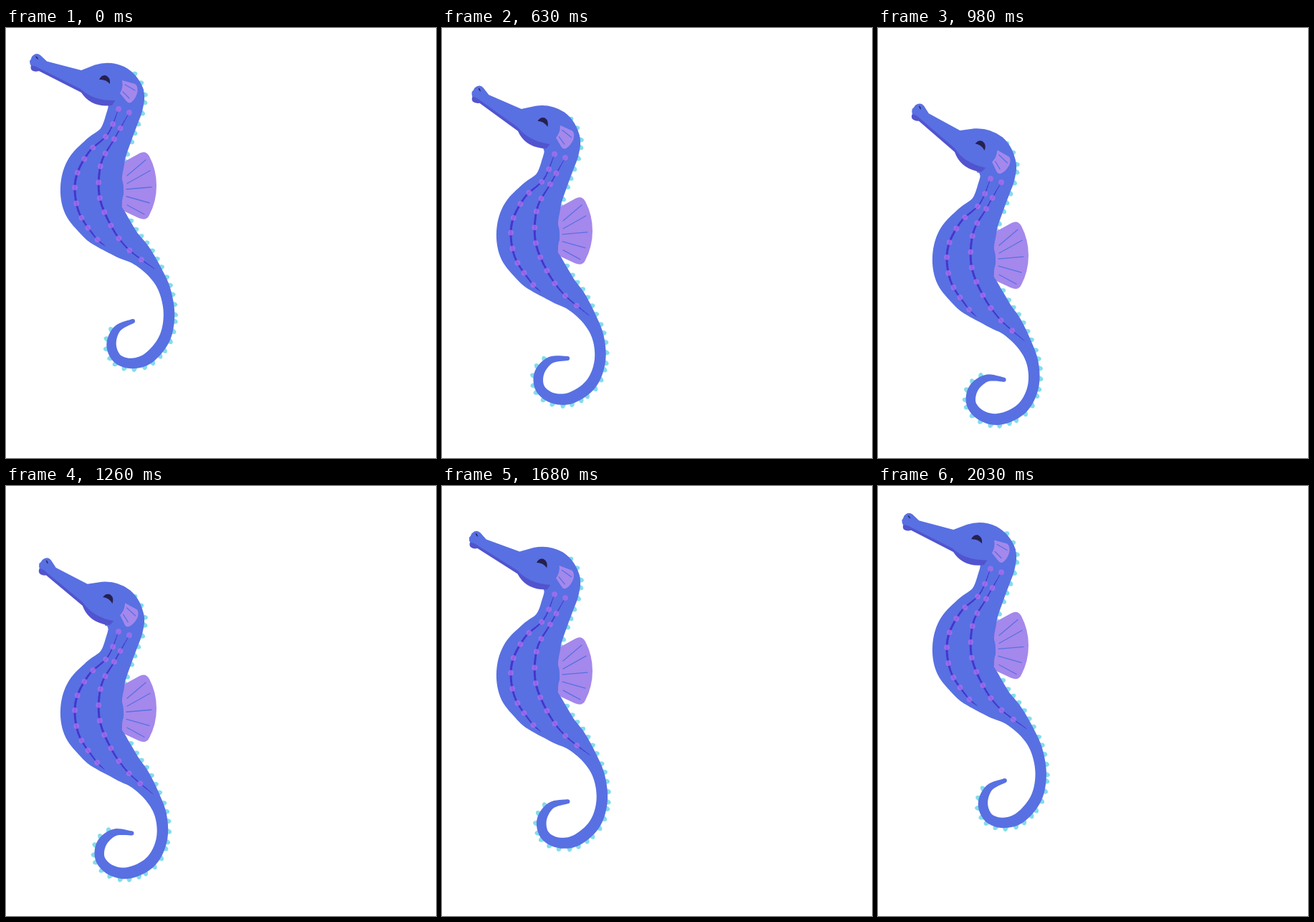
These frames come from a looping animation (600 by 600 pixels, 2100 ms). An HTML page with a canvas:

```html
<!DOCTYPE html>
<html>
<head>
<meta charset="utf-8">
<style>
html, body { margin: 0; width: 100%; height: 100%; overflow: hidden; background: #fff; }
canvas { display: block; width: 600px; height: 600px; }
</style>
</head>
<body>
<canvas id="stage" width="600" height="600"></canvas>
<script>
const ctx = document.getElementById('stage').getContext('2d');
const BLUE = '#5870e2', JAW = '#5154ce', LILAC = '#a488ec', LINE = '#4535cf',
      DOT = '#ae6fee', SPIKE = '#84dcea', INK = '#26204f';
const LOOP = 2100, STEP = 70, HALF = 1065, DROP = 99, NOD = 14.2, DEG = Math.PI / 180;

// Middle of the body from neck to tail tip: x, y, half width
const spine = curve([
  [155, 78, 27], [165, 95, 28], [166.5, 110, 24.5], [162, 126, 23], [152, 152, 23.5],
  [137, 175, 32.5], [124, 199.5, 41], [120, 222, 44], [122.5, 245, 42.7], [132, 266, 35.5],
  [144.5, 280, 31.5], [165.5, 299.5, 23.5], [187, 316, 16.5], [207.5, 340, 10.5],
  [221.5, 366, 8.2], [227.5, 400, 7.7], [221, 433.5, 8], [199.5, 460, 8], [175.5, 468, 7.2],
  [155, 461, 6.7], [147, 441, 6.7], [155.5, 419.5, 5], [177, 409, 3]
]);
const stripes = [
  [[157, 113], [142, 148], [115, 174], [97, 212], [101, 255], [123, 290], [138, 304]],
  [[172, 118], [151, 155], [133, 188], [130, 232], [144, 271], [168, 306], [207, 336]]
].map(curve);
const STRIPE_START = 42, DOT_GAP = 20.9;

// Catmull-Rom curve, eight samples per span
function curve(pts) {
  const out = [], last = pts.length - 1;
  for (let i = 0; i < last; i++) {
    const a = pts[Math.max(i - 1, 0)], b = pts[i], c = pts[i + 1], d = pts[Math.min(i + 2, last)];
    for (let u = 0; u < 1; u += 1 / 8) {
      out.push(b.map((v, j) => v + u / 2 * (c[j] - a[j] +
        u * (2 * a[j] - 5 * v + 4 * c[j] - d[j] + u * (3 * (v - c[j]) + d[j] - a[j])))));
    }
  }
  return [...out, pts[last]];
}

const smooth = u => {
  u = Math.min(Math.max(u, 0), 1);
  return u * u * (3 - 2 * u);
};
const gap = (a, b) => Math.hypot(b[0] - a[0], b[1] - a[1]);

// Turns each step of a line further the closer it lies to the tail tip
function curl(pts, p, s = 0) {
  let [x, y] = pts[0];
  return pts.map((q, i) => {
    if (i) {
      const o = pts[i - 1], dx = q[0] - o[0], dy = q[1] - o[1];
      s += gap(o, q);
      const turn = p * DEG * (4.5 * smooth((s - 235) / 25) + 27 * smooth((s - 320) / 145));
      x += dx * Math.cos(turn) - dy * Math.sin(turn);
      y += dx * Math.sin(turn) + dy * Math.cos(turn);
    }
    return [x, y, q[2]];
  });
}

// Outline on one side of the body: 1 is the back, -1 the belly
function side(mid, sign) {
  return mid.map(([x, y, w], i) => {
    const a = mid[Math.max(i - 1, 0)], b = mid[Math.min(i + 1, mid.length - 1)], k = sign * w / gap(a, b);
    return [x + (b[1] - a[1]) * k, y - (b[0] - a[0]) * k];
  });
}

// Sample numbers at even lengths along a line
function marks(pts, from, to, step) {
  const found = [];
  let s = 0;
  for (let i = 1; i < pts.length; i++) {
    if (s >= from && s < to) {
      found.push(i - 1);
      from += step;
    }
    s += gap(pts[i - 1], pts[i]);
  }
  return found;
}

const openBack = side(spine, 1);
const spikes = [...marks(openBack, 1, 135, 14.4), ...marks(openBack, 216, 550, 13.2)]
  .filter(i => i > 0 && i < spine.length - 5);

function fill(d, color) {
  ctx.fillStyle = color;
  ctx.fill(new Path2D(d));
}

function stroke(d, color, width) {
  ctx.strokeStyle = color;
  ctx.lineWidth = width;
  ctx.stroke(new Path2D(d));
}

function drawSpikes(edge) {
  for (const i of spikes) {
    const a = edge[i - 1], b = edge[i + 1];
    ctx.save();
    ctx.translate(...edge[i]);
    ctx.rotate(Math.atan2(b[1] - a[1], b[0] - a[0]));
    fill('M-4 1Q-3-4.5 .5-5Q4-4.5 3.5 1Z', SPIKE);
    ctx.restore();
  }
}

function drawFin() {
  fill('M155 192L186 175Q195 170 200 179Q210 198 210 220Q210 242 200 261Q196 270 185 265L155 251Z', LILAC);
  stroke('M169 206L195 184M169 217L201 199M168 225L203 222M168 235L200 244M169 247L193 260', BLUE, 1.3);
}

function drawBody(mid, edge) {
  const [x, y, w] = mid[mid.length - 1];
  ctx.fillStyle = BLUE;
  ctx.beginPath();
  for (const q of [...edge, ...side(mid, -1).reverse()]) ctx.lineTo(...q);
  ctx.fill();
  ctx.beginPath();
  ctx.arc(x, y, w, 0, 7);
  ctx.fill();
}

function drawStripe(line, p) {
  const pts = curl(line, p, STRIPE_START), n = pts.length - 1;
  ctx.strokeStyle = LINE;
  for (let i = 0; i < n; i++) {
    ctx.lineWidth = .7 + 2.2 * Math.sin(Math.PI * i / n);
    ctx.beginPath();
    ctx.moveTo(pts[i][0], pts[i][1]);
    ctx.lineTo(pts[i + 1][0], pts[i + 1][1]);
    ctx.stroke();
  }
  ctx.fillStyle = DOT;
  ctx.globalAlpha = .75;
  for (const i of marks(line, 0, 252, DOT_GAP)) {
    if (i > n - 2) continue;
    ctx.beginPath();
    ctx.arc(pts[i][0], pts[i][1], 3.9, 0, 7);
    ctx.fill();
  }
  ctx.globalAlpha = 1;
}

function drawHead() {
  fill('M36 50Q33 56 36 59Q40 62 46 60L105 90Q117 108.5 140 108.5L148 108L153 100L105 78Z', JAW);
  fill('M33 46Q35 44 36 40Q42 33 48 38L57 46.5L105 59L124 51.5Q145 45 165 54Q184 64 192 86' +
       'Q194 98 185 110L160 108L152 101Q122 102 104 85L46 56Q40 52 35 53Q33 50 33 46Z', BLUE);
  fill('M41 39.5Q44 39.5 45 44Q42.5 43 41 39.5Z', INK);
  fill('M130 72Q133 65 139 66Q146 69 145 78Q139 71 130 72Z', INK);
  fill('M162 73L180 78Q184 80 183.5 89Q181 99 175 103.5Q171 106 168 102L159 91Q164 83 162 73Z', LILAC);
  stroke('M166 79L180 87M163 89L172 98', BLUE, 1.3);
}

function draw(t) {
  const p = smooth(1 - Math.abs(1 - t / HALF));
  const mid = curl(spine, p), edge = side(mid, 1);

  ctx.clearRect(0, 0, 600, 600);
  ctx.save();
  ctx.lineCap = 'round';
  ctx.translate(0, DROP * p);
  drawSpikes(edge);
  drawFin();
  drawBody(mid, edge);

  ctx.save();
  ctx.translate(164, 91);
  ctx.rotate(NOD * p * DEG);
  ctx.translate(-164, -91);
  drawHead();
  ctx.restore();

  for (const line of stripes) drawStripe(line, p);
  ctx.restore();
}

const start = performance.now();
function tick() {
  const t = (performance.now() - start) % LOOP;
  draw(Math.floor(t / STEP) * STEP);
  requestAnimationFrame(tick);
}
tick();
</script>
</body>
</html>
```
